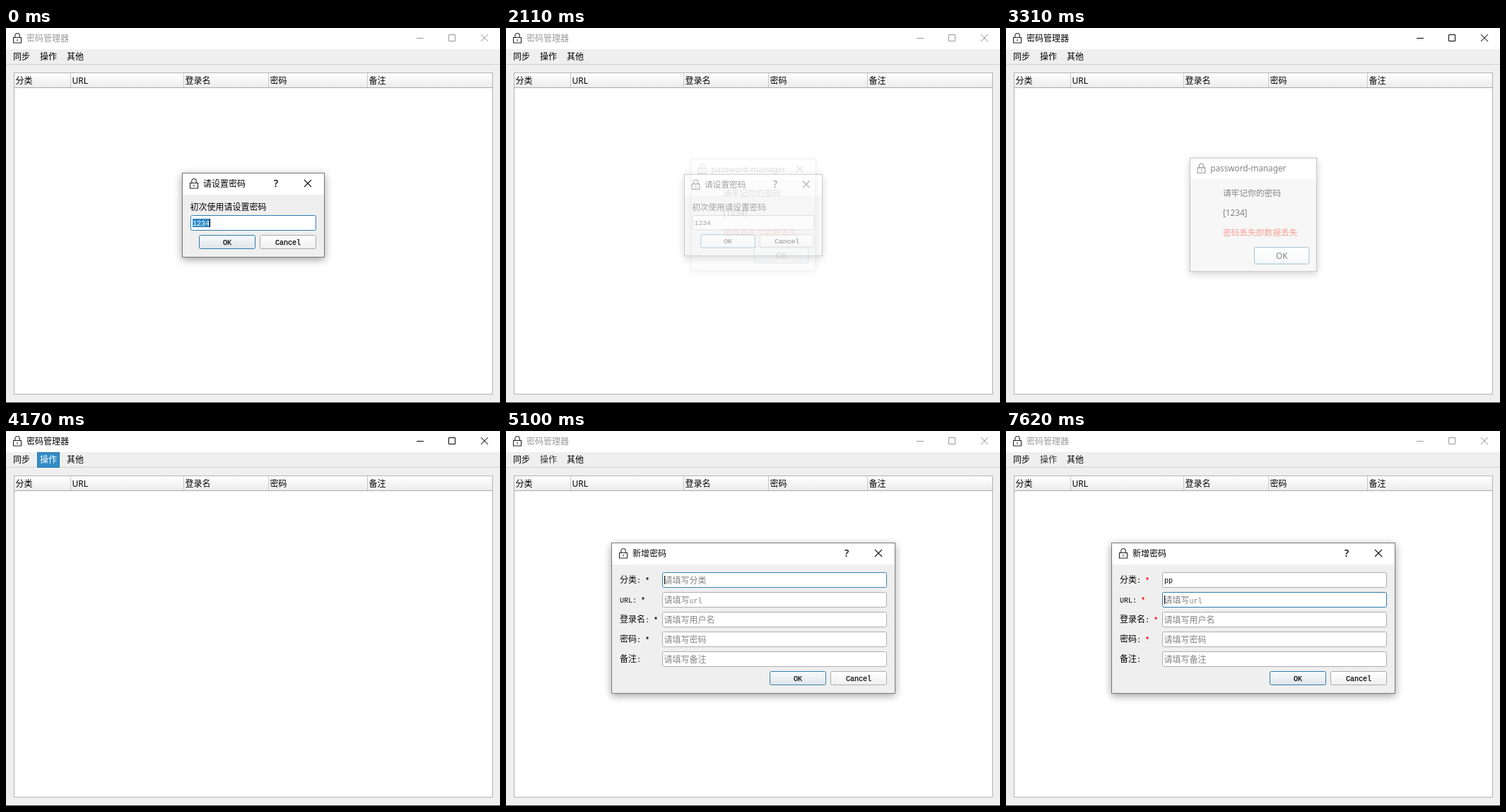
Write an HTML page that moves like this. It is 699 px wide and 531 px high and loops after 8000 ms.

```html
<!DOCTYPE html>
<html lang="zh-CN">
<head>
<meta charset="utf-8">
<title>密码管理器</title>
<style>
html, body { margin: 0; width: 100%; height: 100%; overflow: hidden; background: #efefef; }
svg { display: block; }
text { font: 12px "Noto Sans", "Noto Sans CJK SC", "Noto Sans CJK", sans-serif; white-space: pre; fill: #000; }
.song { font-family: "Noto Sans CJK SC", "Noto Sans CJK", sans-serif; }
.mono { font: 10px "Liberation Mono", monospace; }
.hint { fill: #808080; }
.mid { text-anchor: middle; }
.bold { stroke: #000; stroke-width: .25px; }
.shadow { filter: drop-shadow(0 3px 6px rgba(0, 0, 0, .38)); }
.line { fill: none; stroke: #222; stroke-width: 1.1; }
.caption { fill: var(--caption); }
.controls { fill: none; stroke: var(--caption); }
</style>
</head>
<body>
<svg id="stage" width="699" height="531" viewBox="0 0 699 531"></svg>
<script>
const LOOP = 8000;
const BLUE = '#308cc6';

// Drawing helpers
const fill = (x, y, w, h, color, extra = '') =>
  `<rect x="${x}" y="${y}" width="${w}" height="${h}" fill="${color}" ${extra}/>`;
const frame = (x, y, w, h, color, stroke, extra = '') =>
  fill(x + .5, y + .5, w - 1, h - 1, color, `stroke="${stroke}" ${extra}`);
const text = (x, y, s, extra = '') => `<text x="${x}" y="${y}" ${extra}>${s}</text>`;
const halfWidth = s => s.replace(/[ -~]+/g, run => `<tspan class="mono">${run}</tspan>`);
const song = (x, y, s, cls = '', extra = '') =>
  text(x, y, halfWidth(s), `class="song ${cls}" ${extra}`);
const lock = (x, y) =>
  `<path class="line" transform="translate(${x} ${y})" d="M.5 6.5h11v7.5h-11zM2.8 6.5v-2.8a3.2 3.2 0 0 1 6.4 0v2.8M6 9v2.5"/>`;
const cross = (x, y, extra = '') =>
  `<path d="M${x - 5} ${y - 5}l10 10m0 -10l-10 10" fill="none" ${extra}/>`;
const caret = (id, x, y) => fill(x, y, 1, 12, '#000', `id="${id}"`);

function button(id, x, y, w, h, label, isDefault) {
  const paint = isDefault ? 'url(#primary)' : 'url(#plain)';
  const face = frame(x, y, w, h, paint, isDefault ? '#2f7dac' : '#ababab', `rx="2" id="${id}"`);
  return face + label;
}
const songButton = (id, x, y, label, isDefault) => button(id, x, y, 80, 20,
  text(x + 40, y + 13.5, label, 'class="mono mid bold"'), isDefault);

const field = (id, x, y, w) => frame(x, y, w, 22, '#fff', '#ababab', `rx="2" id="${id}"`);

function dialog(id, x, y, w, h, title, hasHelp, content) {
  const right = x + w - 24;
  return `<g id="${id}">
    ${fill(x, y, w, h, '#efefef', 'class="shadow"')}
    ${fill(x, y, w, 31, '#fff')}
    ${frame(x, y, w, h, 'none', '#777')}
    ${lock(x + 11, y + 8)}
    ${text(x + 30, y + 20, title)}
    ${hasHelp ? text(right - 45, y + 20, '?', 'class="mid bold" style="font-size:14px"') : ''}
    ${cross(right, y + 15, `stroke="#111" stroke-width="1.1" id="${id}X"`)}
    ${content}</g>`;
}

const gradient = (id, top, bottom) =>
  `<linearGradient id="${id}" x2="0" y2="1"><stop stop-color="${top}"/><stop offset="1" stop-color="${bottom}"/></linearGradient>`;

// Main window
const columns = [[11, '分类'], [91, 'URL'], [251, '登录名'], [371, '密码'], [511, '备注']];
const mainWindow = `
  ${fill(0, 0, 699, 531, '#efefef')}
  ${fill(0, 0, 699, 30, '#fff')}
  ${lock(10, 7)}
  ${text(29, 19, '密码管理器', 'class="caption"')}
  <g class="controls"><path d="M581 14.5h10"/><path d="M626.5 9.5h9v9h-9z"/>${cross(677, 14)}</g>
  ${fill(0, 51, 699, 1, '#d2d2d2')}
  ${frame(44, 30, 32, 22, BLUE, '#2876a8', 'id="menuMark"')}
  ${text(10, 45, '同步')}${text(48, 45, '操作', 'id="menuLabel"')}${text(86, 45, '其他')}
  ${frame(11, 63, 678, 456, '#fff', '#b4b4b4')}
  ${fill(12, 64, 676, 20, 'url(#header)')}
  ${fill(12, 84, 676, 1, '#ababab')}
  ${columns.map(([x, name], i) => (i ? fill(x, 64, 1, 20, '#c8c8c8') : '') + text(x + 2.5, 79, name)).join('')}
  ${fill(0, 530, 699, 1, '#3a3a3a')}
  <g id="menu">
    ${frame(44, 51, 118, 24, '#fafafa', '#9a9a9a', 'class="shadow"')}
    ${fill(46, 53, 114, 20, BLUE, 'id="itemMark"')}
    ${text(68, 67, '新增密码', 'id="itemLabel"')}
  </g>`;

// Dialogs
const setDialog = dialog('ask', 249, 205, 202, 120, '请设置密码', true, `
  ${song(260.5, 257.5, '初次使用请设置密码')}
  ${field('askField', 261, 265, 178)}
  ${fill(264, 270, 24, 12, BLUE, 'id="selection"')}
  ${song(264, 279.5, '1234', '', 'id="askValue"')}
  ${caret('askCaret', 288, 270)}
  ${songButton('askOk', 273, 293, 'OK', true)}
  ${songButton('askCancel', 359, 293, 'Cancel')}`);

const noteDialog = dialog('note', 258, 182, 184, 165, 'password-manager', false, `
  ${text(306, 237, '请牢记你的密码')}
  ${text(306, 266, '[1234]')}
  ${text(306, 295, '密码丢失即数据丢失', 'style="fill:#f03a24"')}
  ${button('noteOk', 351, 311, 80, 25, text(391, 328, 'OK', 'class="mid"'), true)}`);

const rows = [['分类', '分类', 1], ['URL', 'url', 1], ['登录名', '用户名', 1], ['密码', '密码', 1], ['备注', '备注', 0]];
const textWidth = s => [...s].reduce((w, c) => w + (c < '~' ? 6 : 12), 0);
const formRows = rows.map(([label, hint, required], i) => {
  const y = 200 + 28 * i;
  const star = required ? song(161 + textWidth(label) + 12, y + 14.5, '*', 'star bold') : '';
  return song(161, y + 14.5, label + ':') + star + field('field' + i, 221, y, 318) +
    song(223.5, y + 15.5, '请填写' + hint, 'hint', `id="hint${i}"`);
}).join('');

const addDialog = dialog('add', 149, 158, 402, 214, '新增密码', true, `
  ${formRows}
  ${song(224, 214.5, '', '', 'id="typed"')}
  ${caret('addCaret', 224, 205)}
  ${songButton('addOk', 373, 340, 'OK', true)}
  ${songButton('addCancel', 459, 340, 'Cancel')}`);

const stage = document.getElementById('stage');
stage.innerHTML = `<defs>
  ${gradient('header', '#ffffff', '#ececec')}
  ${gradient('plain', '#ffffff', '#efefef')}
  ${gradient('primary', '#f9fbfc', '#dde4e9')}
  ${gradient('hover', '#ffffff', '#ebf1f5')}</defs>` + mainWindow + setDialog + noteDialog + addDialog;

// Hard-step tracks: [time, ...values]
const windows = {
  ask: { cx: 350, cy: 265, steps: [[0, 1, 1], [1980, .8, .99], [2050, .6, .98], [2110, .4, .97], [2180, .15, .955], [2240, 0, 1]] },
  note: { cx: 350, cy: 264.5, steps: [[0, 0, 1], [2110, .13, .965], [2180, .5, .982], [2240, .8, .993], [2310, .95, .998],
    [2380, 1, 1], [3310, .48, .98], [3370, .16, .955], [3440, 0, 1]] },
  add: { cx: 350, cy: 265, steps: [[0, 0, 1], [4900, .13, .965], [4970, .55, .982], [5030, .85, .994], [5100, .96, 1], [5170, 1, 1]] },
};
const menuSteps = [[0, 0], [4240, .45], [4300, .8], [4370, 1], [4830, 0]];

const $ = id => document.getElementById(id);
const stepAt = (steps, t) => steps.findLast(s => s[0] <= t);
const within = (t, ...spans) => spans.some(([a, b]) => t >= a && t < b);
const show = (id, on) => { $(id).style.display = on ? '' : 'none'; };
const setFocus = (id, on) => $(id).setAttribute('stroke', on ? '#2f7dac' : '#ababab');
const setHover = (id, on) => $(id).setAttribute('fill', on ? 'url(#hover)' : 'url(#primary)');
const stars = document.querySelectorAll('.star tspan');

function render(t) {
  for (const [id, { cx, cy, steps }] of Object.entries(windows)) {
    const [, opacity, scale] = stepAt(steps, t);
    show(id, opacity > 0);
    $(id).setAttribute('opacity', opacity);
    $(id).setAttribute('transform', `translate(${cx} ${cy}) scale(${scale}) translate(${-cx} ${-cy})`);
  }

  const active = within(t, [1980, 2050], [3310, 4900]);
  stage.style.setProperty('--caption', active ? '#000' : '#999');

  const menuOn = within(t, [4170, 4900]);
  show('menuMark', menuOn);
  $('menuLabel').style.fill = menuOn ? '#fff' : t >= 4900 ? '#333' : '#000';
  $('menu').setAttribute('opacity', stepAt(menuSteps, t)[1]);
  const itemOn = t >= 4370;
  show('itemMark', itemOn);
  $('itemLabel').style.fill = itemOn ? '#fff' : '#000';

  const selected = t < 1120;
  show('selection', selected);
  $('askValue').style.fill = selected ? '#fff' : '#000';
  show('askCaret', within(t, [0, 260], [1120, 1650]));
  setFocus('askField', t < 1980);
  setHover('askOk', t >= 1650);
  setHover('noteOk', t >= 2640);
  show('noteX', t < 3310);

  const typed = 'pp'.slice(0, t >= 6960 ? 2 : t >= 6760 ? 1 : 0);
  const onUrl = t >= 7560;
  $('typed').innerHTML = halfWidth(typed);
  show('hint0', !typed);
  setFocus('field0', !onUrl);
  setFocus('field1', onUrl);
  show('addCaret', !within(t, [5440, 5960]));
  $('addCaret').setAttribute('x', onUrl ? 224 : 224 + 6 * typed.length);
  $('addCaret').setAttribute('y', onUrl ? 233 : 205);
  stars.forEach(star => {
    star.style.fill = star.style.stroke = t >= 5170 ? '#f00000' : '#000';
  });
}

const start = performance.now();
function tick() {
  render((performance.now() - start) % LOOP);
  requestAnimationFrame(tick);
}
tick();
</script>
</body>
</html>
```
